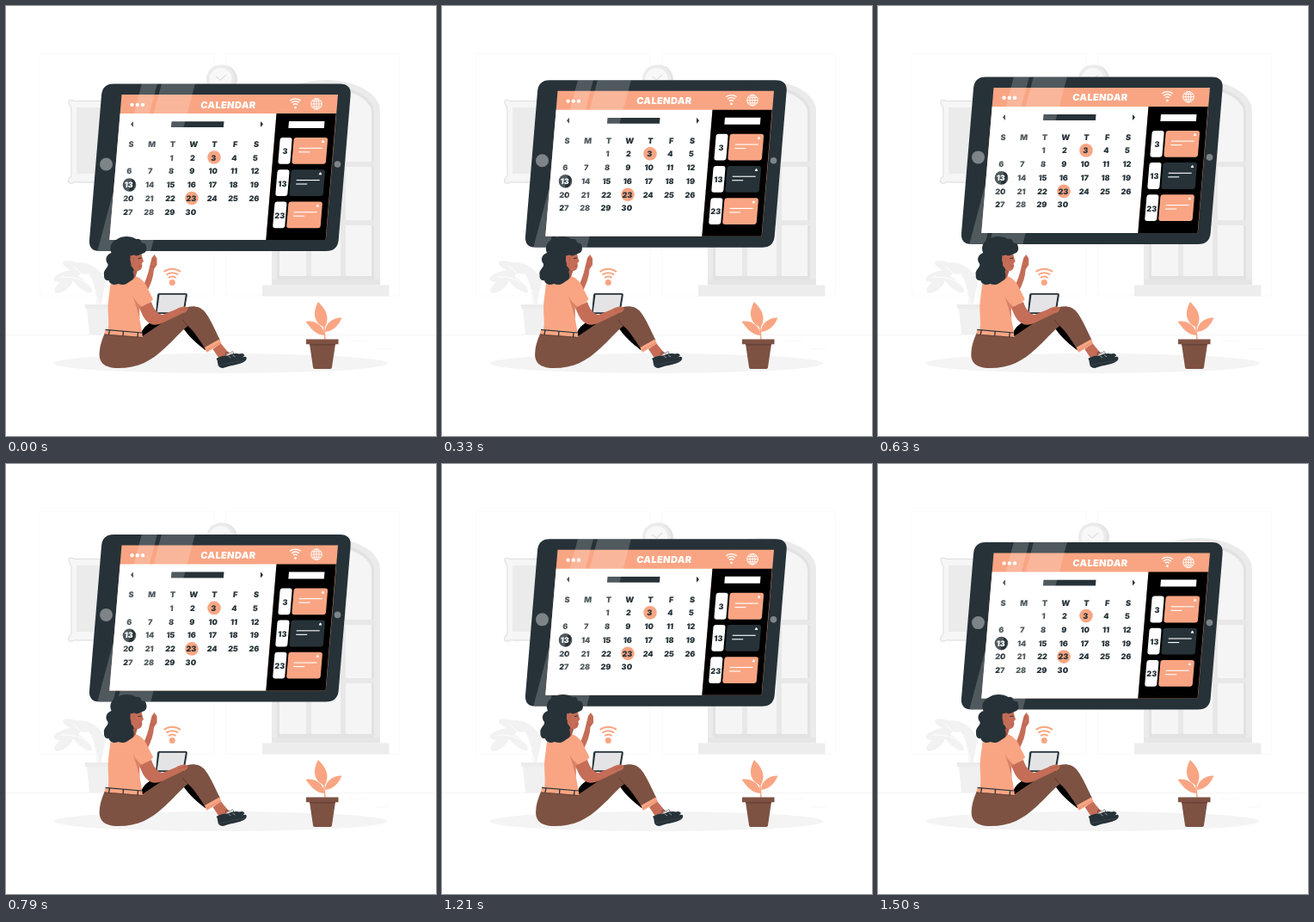
These frames come from a looping animation (500x500 px, 1.54 s). An HTML page with a canvas:

```html
<!DOCTYPE html>
<html lang="en">
<head>
<meta charset="utf-8">
<title>Calendar</title>
<style>
html, body { margin: 0; width: 100%; height: 100%; overflow: hidden; background: #fff; }
canvas { display: block; width: 100vw; height: 100vh; }
</style>
</head>
<body>
<canvas id="stage"></canvas>
<script>
const LOOP = 1540, TOP_TIME = 730, TRAVEL = 10;
const DARK = '#263238', PEACH = '#f9a583', BROWN = '#7d5243', SKIN = '#c56d57', SHADE = '#ad5c4b';
const SKEW = -14 / 169;
const canvas = document.getElementById('stage');
const ctx = canvas.getContext('2d');

function resize() {
  canvas.width = innerWidth * devicePixelRatio;
  canvas.height = innerHeight * devicePixelRatio;
}
addEventListener('resize', resize);
resize();

function fill(path, color) {
  ctx.fillStyle = color;
  ctx.fill(new Path2D(path));
}
function line(path, color, width = 1) {
  ctx.strokeStyle = color;
  ctx.lineWidth = width;
  ctx.stroke(new Path2D(path));
}
function rect(x, y, w, h, color) {
  ctx.fillStyle = color;
  ctx.fillRect(x, y, w, h);
}
function oval(x, y, rx, ry, color, angle = 0) {
  ctx.fillStyle = color;
  ctx.beginPath();
  ctx.ellipse(x, y, rx, ry, angle, 0, Math.PI * 2);
  ctx.fill();
}
const disc = (x, y, r, color) => oval(x, y, r, r, color);

// Leaning box whose left edge is at x on its top side.
function leaning(x, y, w, h, color, radius = 0) {
  ctx.save();
  ctx.transform(1, 0, SKEW, 1, x, y);
  ctx.fillStyle = color;
  ctx.beginPath();
  ctx.roundRect(0, 0, w, h, radius);
  ctx.fill();
  ctx.restore();
}
function label(text, x, y, size, color, spacing = 0) {
  ctx.save();
  ctx.transform(1, 0, SKEW, 1, x, y);
  ctx.font = `900 ${size}px Inter, "Open Sans", sans-serif`;
  ctx.letterSpacing = spacing + 'px';
  ctx.textAlign = 'center';
  ctx.fillStyle = color;
  ctx.fillText(text, 0, size * 0.364);
  ctx.restore();
}
function wifi(x, y, dot, radii, width, color) {
  disc(x, y, dot, color);
  ctx.strokeStyle = color;
  ctx.lineWidth = width;
  for (const r of radii) {
    ctx.beginPath();
    ctx.arc(x, y, r, -Math.PI / 2 - 0.66, -Math.PI / 2 + 0.66);
    ctx.stroke();
  }
}

function drawWindow() {
  fill('M309 318V122A63 36 0 0 1 435 122V318Z', '#ebebeb');
  fill('M315 318V123A56.5 31 0 0 1 428 123V318Z', '#e2e2e2');
  fill('M318 314V124A53 28 0 0 1 425 124V314Z', '#f5f5f5');
  for (const x of [349, 389]) rect(x, 94, 6, 220, '#e8e8e8');
  for (const y of [181, 249]) rect(315, y, 113, 6, '#e8e8e8');
  rect(309, 318, 126, 6.5, '#e6e6e6');
  rect(298, 324.5, 147.5, 13, '#ededed');
}

function drawRoom() {
  line('M39.5 55.5H242V337H39.5ZM255.5 55.5H457.5V337H255.5Z', '#fafafa');
  const frame = 'M73 113Q72 108 77 109.5Q80 111 84 110.5H130V205H84Q80 204 77 206Q71 207 73 201Q77 198 76 193V122Q76 117 73 113Z';
  fill(frame, '#f6f6f6');
  line(frame, '#e3e3e3', 1.3);
  rect(82, 118, 43, 77, '#ebebeb');
  disc(252, 85.5, 17, '#e3e3e3');
  disc(249.5, 85, 16.5, '#ebebeb');
  disc(249.5, 85, 13, '#f8f8f8');
  line('M244 82L249.5 86L256 80', '#e0e0e0', 1.2);
  drawWindow();

  const leaf = '#f2f2f2';
  fill('M106 349C104 325 101 310 83 298C97 297 110 306 116 320L110 349Z', leaf);
  oval(82, 304, 17, 5.5, leaf, 0.35);
  oval(71, 314, 16, 6, leaf, -0.25);
  oval(67, 325, 13, 5.5, leaf, -0.65);
  oval(88, 323, 15, 5, leaf, 0.7);
  line('M108 349Q104 314 64 315M106 333Q94 316 78 302', '#fff', 1);
  rect(92, 347, 31, 5, '#ececec');
  fill('M94 352H122L119 382H97Z', '#f0f0f0');
  rect(0, 382, 500, 0.7, '#f1f1f1');
  rect(398, 389.5, 22, 0.7, '#f3f3f3');
  rect(429, 398.5, 18, 0.7, '#f3f3f3');
  oval(249.5, 415.5, 194, 11.5, '#f4f4f4');
}

function drawPot() {
  line('M371 388Q370.5 376 368 362', PEACH, 1.5);
  fill('M370.5 374C355 367 358 353 363 344C372 353 377 362 370.5 374Z', PEACH);
  fill('M371 383C360 383 354 374 348.5 367C359 365 369 371 371 383Z', PEACH);
  fill('M371 379C371 369 380 362 390.5 362.5C387 371 381 378 371 379Z', PEACH);
  fill('M353 393H383L379 420Q379 422 376 422H360Q357 422 357 420Z', BROWN);
  rect(349, 387.5, 37.5, 5.8, BROWN);
  fill('M353 393.3H383L382.8 394.5H353.2Z', '#653f34');
}

function drawMonth() {
  fill('M148 134V141L145 137.5ZM296 134V141L299 137.5Z', DARK);
  leaning(192.5, 134.2, 61, 6.8, DARK);
  disc(242, 176, 7.8, PEACH);
  disc(143.5, 208, 7.8, DARK);
  disc(216, 223.5, 7.8, PEACH);
  [...'SMTWTFS'].forEach((day, i) => label(day, 145.5 + i * 24.25, 160.7, 9.2, DARK));
  for (let day = 1; day <= 30; day++) {
    const cell = day + 1, col = cell % 7, row = Math.floor(cell / 7);
    label(day, 143.8 + col * 24.35 - row * 0.5, 176.3 + row * 15.75, 9, day === 13 ? '#fff' : DARK);
  }
}

function drawAgenda() {
  fill('M314.5 125H383.8L371.6 272H302.3Z', '#000');
  leaning(329, 134, 41.5, 8, '#fff');
  [[3, PEACH], [13, DARK], [23, PEACH]].forEach(([day, color], i) => {
    const x = 318.8 - i * 3.1, y = 153 + i * 37.2;
    leaning(x, y, 14, 30.8, '#fff', 3);
    leaning(x + 16, y, 39.5, 30.8, color, 3);
    label(day, x + 5.7, y + 16, 9, DARK);
    rect(x + 22, y + 11.7, 27, 1.1, '#fff');
    rect(x + 21.5, y + 16.2, 13, 1.1, '#fff');
    fill(`M${x + 48} ${y + 6}Q${x + 50} ${y} ${x + 51.5} ${y + 6}Z`, '#fff');
  });
}

function drawTablet() {
  const body = new Path2D('M125 90.5H388Q402 90.5 400.6 104L386.7 272Q385.5 285 372 285H109Q96 285 97 272L111 104Q112 90.5 125 90.5Z');
  ctx.fillStyle = DARK;
  ctx.fill(body);
  fill('M134.5 103H386L371.8 272H120.3Z', PEACH);
  fill('M132.7 125H314.5L302.3 272H120.3Z', '#fff');
  disc(116.5, 184, 7.5, '#7e8487');
  disc(385.5, 184, 3.8, '#7e8487');

  for (const x of [146.6, 152.8, 159]) disc(x, 114.8, 2.2, '#fff');
  label('CALENDAR', 258.4, 114.6, 11, '#fff', 0.35);
  wifi(336.5, 118, 1.4, [4.2, 7.2, 10.2], 1.3, '#fff');
  ctx.strokeStyle = '#fff';
  ctx.lineWidth = 1;
  for (const rx of [6.3, 3]) {
    ctx.beginPath();
    ctx.ellipse(361, 113.8, rx, 6.3, 0, 0, Math.PI * 2);
    ctx.stroke();
  }
  line('M361 107.5V120.1M354.7 113.8H367.3M355.7 110.6H366.3M355.7 117H366.3', '#fff', 0.9);

  drawMonth();
  drawAgenda();

  ctx.save();
  ctx.clip(body);
  fill('M158 90H176L124 286H106ZM181 90H220L168 286H129Z', 'rgba(255,255,255,.19)');
  ctx.restore();
}

function drawLegs() {
  fill('M155 385C158 372 168 366 182 362L214 350L206 366L158 388Z', '#000');
  fill('M204 372L212 368L235 396L231 400C222 393 212 385 204 372Z', '#000');
  fill('M240 399L249 392L259 404L248 411Z', SKIN);
  fill('M244 410Q250 406 257 406.5Q265 403 271 404.5Q275 403 277 406Q274 411 262 413L247 414Z', DARK);
  fill('M245 411C254 408 264 411 276 408Q280 407 279 411C276 417 262 417 252 421Q247 421 246 417Z', DARK);
  line('M246 418Q262 414 278 412', '#46535a', 0.5);
  line('M255 406Q254 400 260 404Q264 399 264 405', DARK, 0.6);
  line('M258 407L261 409M263 406L266 408', '#fff', 0.5);
  fill('M114.5 380L158 384L204 353C212 348 224 347 231 356C238 365 243 378 248.5 388.5L232 400C225 389 218 378 211 372C202 379 194 389 184 398C168 413 153 421 130 421C112 421 107 413 108.3 402C109 393 112 386 114.5 380Z', BROWN);
  line('M211 372Q207 368 205 365', '#573329', 0.8);
  fill('M230.5 397L247.5 387.5L250 392.5L233 403Z', PEACH);
  line('M231.5 401L249 391.3', '#d78669', 0.7);
}

function drawTorso() {
  fill('M169 293L172 289L175 293.5L175 301L171.5 306C171 315 168 323 164 331L158 328C162 319 165 311 166.5 303Z', SKIN);
  line('M170 293L172 297M172 303L168 303', SHADE, 0.7);
  fill('M121 323C130 326 140 318 146 313C154 314 161 320 164 328L170.5 341Q165 348 155 351L154 360Q156 369 158 382L118 378C120 365 117 355 118.5 343Z', PEACH);
  fill('M147 337Q152 347 158 349.5L154.5 351L155 365Q152 351 147 337Z', '#d88267');
  fill('M115 376.5L157.5 380L158.5 385L114 381.5Z', PEACH);
  line('M115 376.3L157.5 380', DARK, 1.2);
  line('M114.2 382L158 385.5', '#613d33', 0.7);
  line('M120 377L119 382M136 378L135.5 383.5M153 380L152.5 385', DARK, 1.3);
}

function drawHead() {
  fill('M143 302L153 306L151 312Q150 317 145 319L142 315Z', SHADE);
  fill('M143 288H157Q157.5 292 159.5 297L157.5 299Q159 306 153.5 308Q148 308 144 304Z', SKIN);
  line('M153 293.5L157 293', DARK, 1);
  line('M154 303L157.5 302', SHADE, 0.9);
  fill('M151 271C145 267 134 267 129 271C122 274 119 280 122 287C116 289 114 295 118 300C119 304 112 307 113.5 313C113 317 116 320 119 319C120 324 126 325 130 323C137 326 141 322 144 320C149 318 149 313 147 309C150 306 146 304 145 302L144 290Q151 292 158 288C164 287 164 280 161 276Q156 276 156 272Q153 270 151 271Z', DARK);
  oval(147.8, 294.5, 3.9, 5, SKIN, 0.15);
  line('M147 292Q149 293 148 297', SHADE, 0.7);
}

function drawDevice() {
  fill('M178 334H209Q211.3 334.2 210.7 337L207.5 356Q207 358 205 358H176Q173.7 358 174.2 355.5L176 336Q176.3 334 178 334Z', DARK);
  fill('M178.5 335.7H208.8L205.5 356.3H175.7Z', '#e4e4e6');
  fill('M155 351L169 344C172 353 176 358 182 359L197 353C203 349 211 348 211.5 352Q211 356 204 358L181 369C169 374 163 367 159 360Z', SKIN);
  line('M201 354L210 352', SHADE, 0.7);
}

// Straight up and down, resting nowhere.
function floatOffset(t) {
  const away = Math.abs(t - TOP_TIME);
  return TRAVEL * Math.min(away, LOOP - away) / (LOOP / 2) - 9.4;
}

function draw(time) {
  const t = time % LOOP;
  const sway = 0.5 - 0.5 * Math.sin(2 * Math.PI * t / LOOP);

  ctx.setTransform(canvas.width / 500, 0, 0, canvas.height / 500, 0, 0);
  rect(0, 0, 500, 500, '#fff');
  drawRoom();
  drawPot();

  ctx.save();
  ctx.translate(0, floatOffset(t));
  drawTablet();
  ctx.restore();

  ctx.save();
  ctx.translate(sway, 0);
  drawLegs();
  drawTorso();
  drawHead();
  ctx.restore();
  drawDevice();
  wifi(193.3, 321.5, 3.5, [6.8, 11.3, 15.8], 2, PEACH);
}

const start = performance.now();
function tick() {
  draw(performance.now() - start);
  requestAnimationFrame(tick);
}
tick();
</script>
</body>
</html>
```
